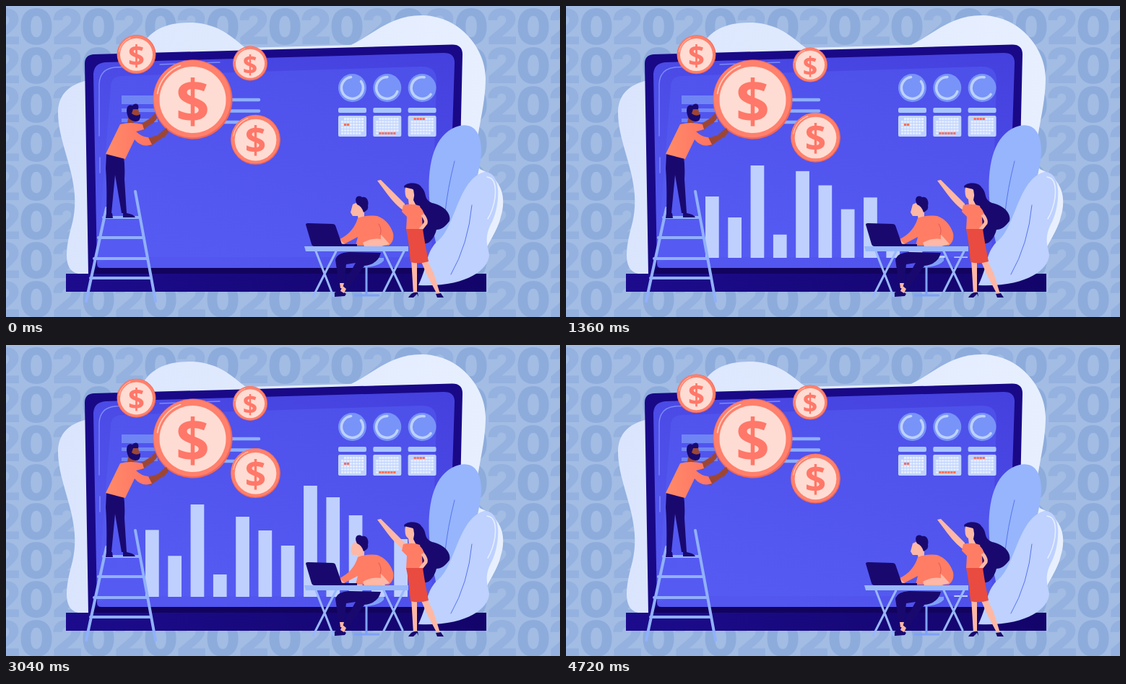
Recreate the animation shown at these times as an HTML page. Size 767 by 431 pixels, loop 4800 ms.

```html
<!DOCTYPE html>
<html lang="en">
<head>
<meta charset="utf-8">
<title>Growing bar chart</title>
<style>
  html, body { margin: 0; width: 100%; height: 100%; overflow: hidden; background: #a2bce4 }
  svg { display: block; width: 100vw; height: 100vh }
  text { font-family: "Open Sans", sans-serif; font-weight: 700; text-anchor: middle }
  #digits text { font-family: Inter, sans-serif; font-weight: 900 }
  .line { fill: none; stroke-linecap: round; stroke-linejoin: round }
  .navy { fill: #19096f }
  .peach { fill: #ffb8a5 }
  .orange { fill: #ff7d65 }
  .brown { fill: #9d4635 }
</style>
</head>
<body>
<svg viewBox="0 0 767 431" preserveAspectRatio="none">
  <defs>
    <linearGradient id="blob">
      <stop stop-color="#dae5fd"/><stop offset="1" stop-color="#e8f0ff"/>
    </linearGradient>
    <linearGradient id="screen" x1="1" y1="0" x2=".4" y2="1">
      <stop stop-color="#4440de"/><stop offset="1" stop-color="#5356ef"/>
    </linearGradient>
    <linearGradient id="panel" x1=".8" y1="0" x2=".3" y2="1">
      <stop stop-color="#4e50ea"/><stop offset="1" stop-color="#555bf2"/>
    </linearGradient>
    <linearGradient id="base">
      <stop stop-color="#1c0c8d"/><stop offset="1" stop-color="#13046a"/>
    </linearGradient>
    <linearGradient id="shirt">
      <stop stop-color="#ff8a68"/><stop offset="1" stop-color="#ff7464"/>
    </linearGradient>
    <g id="coin">
      <circle r="55" fill="#ef6559"/>
      <circle cx="-.6" cy="-.8" r="53.5" fill="#ff806c"/>
      <circle cy=".5" r="46" fill="#ffdcd3"/>
      <path class="line" d="M-49 -8A50 50 0 0 1 -17 -47" stroke="#ffd0c4" stroke-width="1.6"/>
      <text y="32" font-size="82" fill="#ff7869">$</text>
    </g>
  </defs>

  <g id="digits" fill="#8babdc" font-size="67"></g>

  <path fill="url(#blob)" d="M100 371C76 366 84 330 92 300C106 240 71 195 72 145C74 118 92 109 109 104L185 64C195 32 225 22 258 23C298 25 315 46 332 58L478 54C508 40 532 12 578 13C630 15 664 60 664 100C664 150 642 200 656 226C690 240 692 270 685 292C680 315 664 330 650 371Z"/>

  <!-- big laptop -->
  <path fill="#190987" d="M109 80Q109 68 121 67L617 53.500Q632 53 632 67L625 372H114Z"/>
  <path fill="url(#screen)" d="M121 94Q122 79 138 78L606 65Q622 65 621 80L612 357Q612 363 605 363H132Q126 363 126 357Z"/>
  <path fill="url(#panel)" d="M145 112Q145 98 160 97L574 84Q596 83 596 103L589 338Q588 348 578 348H152L126 357Z"/>
  <path class="line" stroke="#7d8cfa" stroke-width="1.300" d="M129 180V108Q130 87 151 85L197 83M213 81L296 78M130 210V231"/>
  <rect x="83" y="371" width="582" height="25" fill="url(#base)"/>
  <path fill="#12035f" d="M126 363H612L620 371H114Z"/>

  <!-- screen widgets -->
  <path fill="#7085f4" d="M160 124H210V136H160ZM160 142H210V147H160ZM160 156H210V161H160Z"/>
  <path class="line" stroke="#8eaffc" stroke-width="4.500" d="M300 130H350M300 145.500H350M300 161H350"/>
  <g id="widgets"></g>
  <g id="bars"></g>

  <!-- leaves -->
  <path fill="#96b5fc" d="M598 340C580 270 575 180 628 166C658 160 662 195 655 225C647 268 630 310 598 340Z"/>
  <path fill="#bed1ff" d="M571 387C586 355 580 345 596 327C622 310 625 240 662 230C686 229 685 272 673 299C660 322 668 335 669 345C668 366 636 390 571 387Z"/>
  <path class="line" stroke="#5774ee" stroke-width="1" d="M621 215Q611 255 608 286M645 276Q640 330 616 372"/>
  <path class="line" stroke="#e8f0ff" stroke-width="1.500" d="M666 237Q680 238 677 266Q674 284 667 295"/>

  <!-- ladder and climber -->
  <path class="line" stroke="#91b0fb" stroke-width="4" d="M139 280L111 409M179 257L207 409M135 293H185M128 321H191M122 350H196M117 377H201"/>
  <path class="navy" d="M139 204L163 209Q165 222 164 240L167 287H160L151 234L146 287H139Q140 250 138 225ZM139 287H147L148 294H138ZM162 287H167Q178 289 179 293H162Z"/>
  <path class="brown" d="M183 166L202 154L206 149L209 156L202 163L188 173ZM190 185L210 179L220 170L225 174L216 183L199 195Z"/>
  <path class="brown" d="M172 142H183L185 152Q186 161 177 161L177 166H167Z"/>
  <path class="navy" d="M168 151C165 140 170 135 175 138C180 133 185 136 183 143H176L174 149Q180 154 186 150Q187 160 179 160Q170 159 168 151Z"/>
  <path fill="url(#shirt)" d="M158 164Q172 160 189 164L191 171L180 174Q187 181 197 182L202 192Q188 197 178 185L165 212L138 205Z"/>

  <!-- desk, chair, seated man -->
  <path class="line" stroke="#7fa1f7" stroke-width="3" d="M499 350V400M483 401H516"/>
  <path fill="#7fa1f7" d="M485 349H523V353Q516 361 497 362Z"/>
  <path class="navy" d="M519 342Q515 358 496 360L471 396L464 391L484 356L471 358L468 385H461L456 352Q458 342 475 341ZM455 397Q463 391 471 399L469 402L455 403Z"/>
  <path class="peach" d="M462 384H468L466 391H463ZM466 388L471 392L468 398L463 395Z"/>
  <path class="peach" d="M480 275Q488 270 496 276V292L488 297L487 291H480L477 286Z"/>
  <path class="navy" d="M486 275C481 266 487 261 493 265C499 263 503 270 501 277Q503 282 495 286Q493 278 486 275Z"/>
  <path class="orange" d="M487 294Q498 289 514 291Q530 297 536 315Q538 326 530 332H484L487 320L468 330L462 323Q481 314 487 294Z"/>
  <path class="peach" d="M462 323L459 319L463 329L469 330ZM494 328Q506 321 519 323V317L523 321L531 330L520 333H496Z"/>
  <path class="line" stroke="#de5953" stroke-width="1" d="M516 302Q521 310 518 317"/>
  <path class="line" stroke="#9ab8fb" stroke-width="3" d="M429 340L453 402M457 340L425 403M523 340L549 395M551 340L523 396"/>
  <path fill="#9ab8fb" d="M413 333H557V340H415Z"/>
  <path class="navy" d="M415 303Q415 301 418 301L452 302Q455 302 456 304L465 330H486V333H427Q424 333 423 330Z"/>

  <!-- standing woman -->
  <path class="navy" d="M551 250C555 244 571 244 575 251C584 260 577 267 590 273C604 276 617 286 614 298C608 306 603 310 596 310C593 322 584 333 577 328Q566 295 562 266Z"/>
  <path class="peach" d="M514 242L519 241L525 247L552 274L553 285Q540 278 523 254ZM553 251Q563 250 566 258L564 269L568 277H558L557 268Q551 265 553 251Z"/>
  <path class="navy" d="M551 251Q560 241 570 250L571 273Q565 266 564 254Z"/>
  <path class="peach" d="M561 350H569L569 396L564 400ZM573 350H582L592 370L601 399L596 398L583 373Z"/>
  <path class="orange" d="M550 276Q563 273 573 277L576 291L577 310H554L555 292L548 285Z"/>
  <path class="line" stroke="#ffb8a5" stroke-width="5" d="M572 284Q583 295 581 301L573 311"/>
  <path class="orange" d="M565 277Q575 276 579 288L571 292Z"/>
  <path fill="#e94b40" d="M554 309H577Q580 330 585 354Q572 358 560 355Q558 328 554 309Z"/>
  <path class="navy" d="M557 404Q562 395 570 397L571 403L569 399L564 404ZM595 399L602 398L606 404H597Z"/>

  <use href="#coin" x="258.500" y="129.500"/>
  <path class="brown" d="M202 153L207 149L208 157L203 163ZM214 179L222 169L225 175L218 183Z"/>
  <use class="float" href="#coin"/>
  <use class="float" href="#coin"/>
  <use class="float" href="#coin"/>
</svg>
<script>
const $ = id => document.getElementById(id);
function add(parent, tag, attrs) {
  const el = document.createElementNS("http://www.w3.org/2000/svg", tag);
  for (const key in attrs) el.setAttribute(key, attrs[key]);
  parent.append(el);
  return el;
}
const rect = (parent, x, y, width, height, fill, rx = 0) =>
  add(parent, "rect", { x, y, width, height, fill, rx });

// Backdrop digits
for (let row = 0; row < 9; row++)
  for (let col = 0; col < 19; col++) {
    const digit = add($("digits"), "text", { x: -1 + col * 43, y: 53 + row * 54, opacity: col % 2 ? .9 : .6 });
    digit.textContent = col % 2 ? 0 : 2;
  }

// Gauges, and calendars with one run of marked days: [row, count]
const marks = [[2, 2], [5, 6], [0, 4]];
const arcs = ["M-2 -15A15 15 0 1 0 12 -9", "M0 -15A15 15 0 1 0 14 5", "M12 9A15 15 0 1 1 3 -14.700"];
marks.forEach(([line, count], n) => {
  const x = 460 + n * 48.3, g = $("widgets");
  add(g, "circle", { cx: x + 19.5, cy: 113.5, r: 19.5, fill: "#7894f8" });
  add(g, "path", { d: arcs[n], transform: `translate(${x + 19.5} 113.5)`, class: "line", stroke: "#bdd1ff", "stroke-width": 3.6 });
  rect(g, x, 141, 39, 7, "#a9c5ff", 2);
  rect(g, x, 152, 39, 29, "#bfd2ff", 2);
  for (let r = 0; r < 6; r++)
    for (let c = 0; c < 8; c++) {
      if (r == 0 && c == 0 || r == 5 && c == 7) continue;
      const marked = r == line && c >= 1 && c <= count;
      rect(g, x + 4 + c * 4, 155 + r * 4, 3.2, 3, marked ? "#ff6f55" : "#e4edff");
    }
});

const LOOP = 4800, STEP = 80, BASE = 349, LAG = 87;
const heights = [85, 56, 128, 31, 111, 92, 71, 154, 138, 113, 50, 80];
const bars = heights.map((h, i) => rect($("bars"), 193 + i * 31.3, BASE, 18.7, 0, "#bfd0ff"));

const clamp = v => Math.min(1, Math.max(0, v));
const ease = v => (v = clamp(v)) < .5 ? 4 * v ** 3 : 1 - 4 * (1 - v) ** 3;

// Slow start, steep rise, overshoot, settle
const rise = [[.48, .23], [.58, .75], [.68, 1.08], [.78, 1.1], [.9, 1.065], [1, 1]];
function grow(v) {
  v = clamp(v);
  if (v < .48) return .23 * (v / .48) ** 2;
  const k = Math.max(1, rise.findIndex(p => p[0] >= v));
  const [x0, y0] = rise[k - 1], [x1, y1] = rise[k];
  return y0 + (y1 - y0) * (v - x0) / (x1 - x0);
}
// Short stretch, then drop to zero
const shrink = ms => (1 + .1 * ease(ms / 225)) * (1 - ease((ms - 260) / 760));

// x, mean y, amplitude, time of lowest point, scale
const floats = [
  [180.5, 69.7, 4, 3050, .49],
  [338, 80.7, 1.3, 2000, .436],
  [345.5, 181.4, 4.2, 300, .627]
];
const coins = document.querySelectorAll(".float");

function draw(now) {
  const t = Math.floor(now % LOOP / STEP) * STEP;
  bars.forEach((bar, i) => {
    const start = i ? 281 + i * LAG : 110;
    const h = heights[i] * grow((t - start) / 870) * shrink(t - 2880 - i * LAG);
    bar.setAttribute("y", BASE - h);
    bar.setAttribute("height", h);
  });
  floats.forEach(([x, y, amp, low, scale], i) => {
    const cy = y + amp * Math.cos(2 * Math.PI * (t - low) / LOOP);
    coins[i].setAttribute("transform", `translate(${x} ${cy}) scale(${scale})`);
  });
  requestAnimationFrame(draw);
}
requestAnimationFrame(draw);
</script>
</body>
</html>
```
